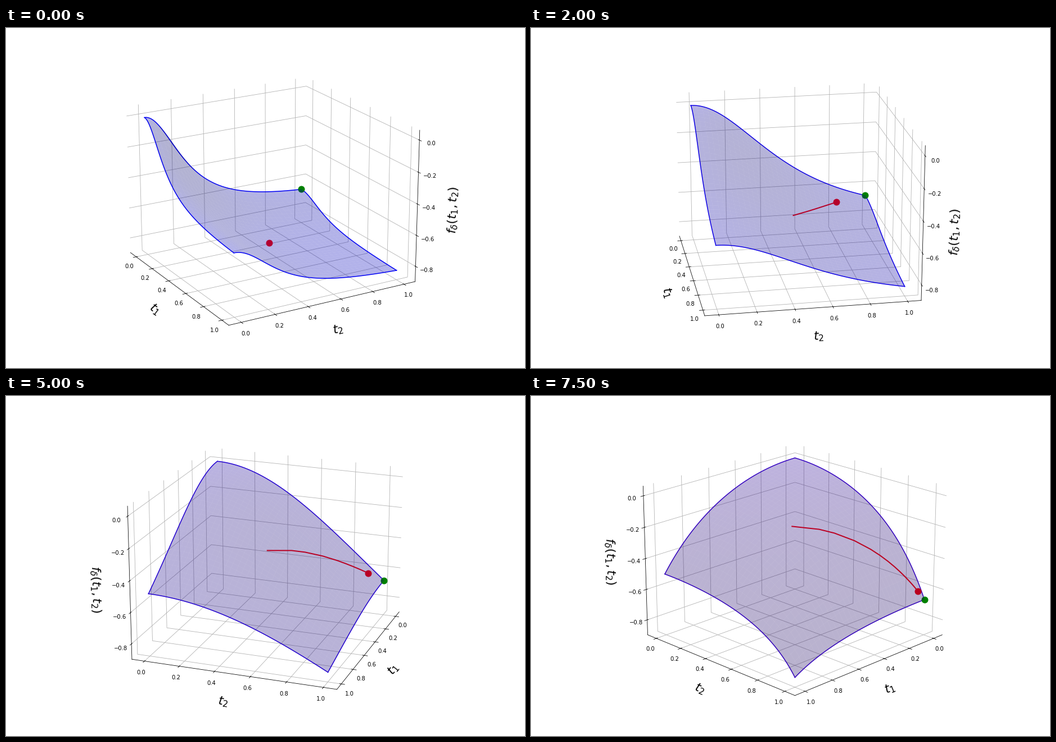
A matplotlib script that plays this animation: 923x606 px, repeating every 8 s.

```python
import numpy as np
import matplotlib.pyplot as plt
from matplotlib.animation import FuncAnimation

W, H, DPI = 923, 606, 72
FRAMES, INTERVAL = 16, 500
PAD = 10.8

# Regression objective: scores Q with the response, correlation R of the
# predictors, and their variances S
Q1, Q2, R = 0.7071, 0.8167, 0.402
S1, S2 = 1.14, 0.925
Z_MIN = -0.838


def objective(t1, t2, delta):
    a = t1**2 + delta / S1 * (1 - t1**2)
    b = t2**2 + delta / S2 * (1 - t2**2)
    c = R * t1 * t2
    u, v = Q1 * t1, Q2 * t2
    return -(u**2 * b + v**2 * a - 2 * c * u * v) / (a * b - c**2)


def delta_at(i):
    return 0.12 * np.exp(0.171 * i - 0.65 * np.exp(-0.85 * i))


# Iterates stay on t1 + t2 = 1 and decay towards (0, 1)
KEYS = [0, 1, 2, 3, 4, 8, 10, 13, 15]
LEFT = [0.511, 0.408, 0.350, 0.273, 0.211, 0.098, 0.071, 0.0385, 0.0262]
path_t1 = np.exp(np.interp(np.arange(FRAMES), KEYS, np.log(LEFT)))

s = np.linspace(0, 1, 101)
zero, one = np.zeros_like(s), np.ones_like(s)
EDGES = [(s, zero), (s, one), (zero, s), (one, s)]
T1, T2 = np.meshgrid(s, s)

fig = plt.figure(figsize=(W / DPI, H / DPI), dpi=DPI)
ax = fig.add_axes([PAD / W, PAD / H, 1 - 2 * PAD / W, 1 - 2 * PAD / H],
                  projection="3d")


def padded(lo, hi):
    m = (0.05 + 1.1 / 48) * (hi - lo)
    return lo - m, hi + m


ax.set_xlim(*padded(0, 1))
ax.set_ylim(*padded(0, 1))
ax.set_zlim(*padded(Z_MIN, 0))
for axis in (ax.xaxis, ax.yaxis, ax.zaxis):
    axis.pane.fill = False
    axis.pane.set_edgecolor("w")
label = dict(fontsize=22, labelpad=15)
ax.set_xlabel("$t_1$", **label)
ax.set_ylabel("$t_2$", **label)
ax.set_zlabel(r"$f_\delta(t_1, t_2)$", **label)

edges = [ax.plot([], [], [], lw=1.5)[0] for _ in EDGES]
trail, = ax.plot([], [], [], color="red", lw=2)
target, = ax.plot([], [], [], "o", color="green", ms=11)
head, = ax.plot([], [], [], "o", color="red", ms=11)
surface = None


def update(i):
    global surface
    delta = delta_at(i)
    mix = i / 72
    color = (mix, 0, 1 - mix)
    if surface is not None:
        surface.remove()
    surface = ax.plot_surface(T1, T2, objective(T1, T2, delta), color=color,
                              alpha=0.3, linewidth=0, antialiased=True)
    for line, (a, b) in zip(edges, EDGES):
        line.set_data_3d(a, b, objective(a, b, delta))
        line.set_color(color)
    a = path_t1[:i + 1]
    b = 1 - a
    z = objective(a, b, delta)
    trail.set_data_3d(a, b, z)
    head.set_data_3d(a[-1:], b[-1:], z[-1:])
    target.set_data_3d([0], [1], [objective(0, 1, delta)])
    ax.view_init(elev=20, azim=-30 + 5 * i)
    return []


anim = FuncAnimation(fig, update, frames=FRAMES, interval=INTERVAL,
                     init_func=lambda: [], repeat=True, repeat_delay=0)
plt.show()
```
